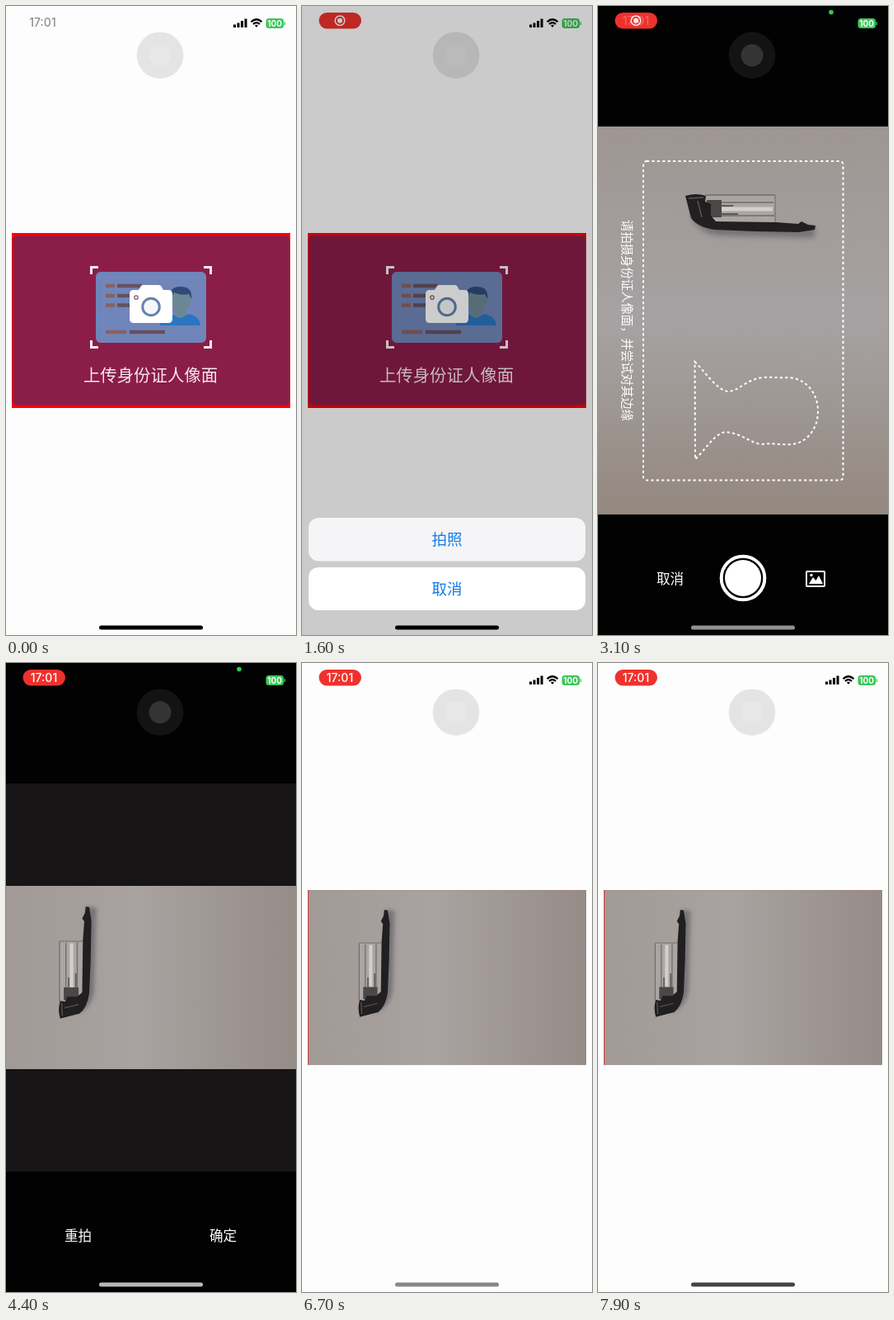
These frames come from a looping animation (352x762 px, 8000 ms). An HTML page:

```html
<!DOCTYPE html>
<html lang="zh-CN">
<head>
<meta charset="utf-8">
<title>上传身份证</title>
<style>
  html, body { margin: 0; width: 100%; height: 100%; overflow: hidden; background: #fdfdfe; }
  svg { display: block; width: 352px; height: 762px; }
  text { font-family: "Noto Sans CJK SC", "Noto Sans CJK", sans-serif; text-anchor: middle; }
  .num { font-family: Inter, Roboto, sans-serif; font-weight: 500; }

  .clock, .pill, .rec, .time, .dot, .dim, .sheet, .camera, .late, .bar {
    animation: 8s linear infinite both;
  }
  .clock { animation-name: clock; }
  .pill { animation-name: pill; }
  .rec { animation-name: rec; }
  .time { animation-name: time; }
  .dot { animation-name: dot; }
  .dim { animation-name: dim; }
  .sheet { animation-name: sheet; }
  .camera { animation-name: camera; }
  .late { animation-name: late; }
  .bar { animation-name: bar; }

  @keyframes clock { 0% { opacity: .55 } 3%, 100% { opacity: 0 } }
  @keyframes pill { 0%, 1% { opacity: 0 } 4%, 100% { opacity: 1 } }
  @keyframes rec { 0%, 38.5% { opacity: 1 } 41.5%, 100% { opacity: 0 } }
  @keyframes time { 0%, 38% { opacity: 0 } 41%, 100% { opacity: 1 } }
  @keyframes dot {
    0%, 36.4% { opacity: 0 }
    36.5%, 77.4% { opacity: 1 }
    77.5%, 100% { opacity: 0 }
  }
  @keyframes dim {
    0% { opacity: 0 }
    10.3% { opacity: 0; animation-timing-function: cubic-bezier(.32, .72, 0, 1) }
    16.5% { opacity: .2 }
    28.1% { opacity: .2; animation-timing-function: ease-in-out }
    31%, 100% { opacity: 0 }
  }
  @keyframes sheet {
    0% { transform: translateY(144px) }
    10.3% { transform: translateY(144px); animation-timing-function: cubic-bezier(.32, .72, 0, 1) }
    16.5% { transform: none }
    28.1% { transform: none; animation-timing-function: ease-in-out }
    31%, 100% { transform: translateY(144px) }
  }
  @keyframes camera {
    0% { transform: translateY(762px) }
    32.5% { transform: translateY(762px); animation-timing-function: cubic-bezier(.32, .72, 0, 1) }
    38.5% { transform: none }
    73.75% { transform: none; animation-timing-function: cubic-bezier(.32, .72, 0, 1) }
    79.5%, 100% { transform: translateY(762px) }
  }
  @keyframes late { 0%, 49.99% { opacity: 0 } 50%, 100% { opacity: 1 } }
  @keyframes bar {
    0%, 34% { fill: #000 }
    38.5% { fill: #8e8e8e }
    42%, 77% { fill: #b8b8b8 }
    83.75% { fill: #888 }
    98%, 100% { fill: #444 }
  }
</style>
</head>
<body>
<svg viewBox="0 0 352 762">
  <defs>
    <linearGradient id="desk" x2="0" y2="1">
      <stop offset="0" stop-color="#9e9692"/>
      <stop offset=".5" stop-color="#a6a2a3"/>
      <stop offset="1" stop-color="#94887f"/>
    </linearGradient>
    <linearGradient id="wide">
      <stop offset="0" stop-color="#a19a97"/>
      <stop offset=".45" stop-color="#a8a2a0"/>
      <stop offset="1" stop-color="#968c88"/>
    </linearGradient>
    <filter id="soft" x="-20%" y="-80%" width="140%" height="260%"><feGaussianBlur stdDeviation="3"/></filter>

    <g id="pen">
      <path d="M112 250 Q118 274 146 278 L262 281 L264 269 L140 262Z" fill="#56545c" opacity=".6" filter="url(#soft)"/>
      <rect x="129" y="228" width="87" height="34" rx="2" fill="#aaa5a3"/>
      <path d="M130 229H215M130 238H213M130 254H214" stroke="#706c6a" stroke-width="1.5"/>
      <path d="M150 246H212" stroke="#d2cfcd" stroke-width="5"/>
      <path d="M132 235H150V256H132Z" fill="#4a4746"/>
      <path d="M149 242H164M149 252H170" stroke="#5d5958" stroke-width="2"/>
      <path d="M215 229V262" stroke="#888380" stroke-width="2"/>
      <path d="M106 230Q119 226 131 230L130 237L137 240V254L143 261L216 262L243 264L247 261L255 265L264 266L263 271L244 274L190 273L142 271Q121 268 113 257Z" fill="#211f20"/>
      <path d="M110 233L128 232M121 236L126 256" stroke="#595554" stroke-width="1.5"/>
    </g>

    <g id="photo">
      <rect y="270" width="352" height="222" fill="url(#wide)"/>
      <use href="#pen" transform="matrix(0 -.86 .86 0 -132 522)"/>
    </g>
  </defs>

  <!-- upload page -->
  <rect width="352" height="762" fill="#fdfdfe"/>
  <text class="num clock" x="44.5" y="25" font-size="14" fill="#333">17:01</text>
  <path d="M277.5 26V22.5M282 26V20.5M286.5 26V18M291 26V15.5" stroke="#000" stroke-width="3"/>
  <g fill="none" stroke="#000" stroke-width="2.2">
    <path d="M297.5 19.3Q304 13.2 310.5 19.3M300 22Q304 18.3 308 22"/>
    <path d="M302 23.6Q304 22 306 23.6L304 26Z" fill="#000" stroke="none"/>
  </g>

  <rect x="7" y="275" width="338" height="212" fill="#f5050c"/>
  <rect x="8" y="278.5" width="336" height="205" rx="5" fill="#8b1d49"/>
  <rect x="109" y="322" width="134" height="86" rx="6" fill="#7085b9"/>
  <g stroke-width="4.5">
    <path d="M121 339H132M121 351H132M121 362.5H132M121 395H146" stroke="#8a6160"/>
    <path d="M135 339H165M135 351H160M135 362.5H160M150 395H193" stroke="#66505f"/>
  </g>
  <path d="M187 387Q188 376 201 373L211 378L222 373Q235 376 236 387Z" fill="#2b75c2"/>
  <path d="M201 349Q212 341 224 350Q224 366 218 371V375Q211 380 205 375V370Q200 363 201 349Z" fill="#6c8794"/>
  <path d="M200 354Q197 341 210 340Q227 339 225 355L222 349Q212 351 204 347Z" fill="#304a7b"/>
  <path d="M155 344H161L164 339Q165 338 167 338H185Q187 338 188 339L191 344H197Q202 344 202 349V379Q202 384 197 384H155Q150 384 150 379V349Q150 344 155 344Z" fill="#fff"/>
  <circle cx="176" cy="364.5" r="10.3" fill="#f5f7fb" stroke="#6682ad" stroke-width="3"/>
  <circle cx="158" cy="353" r="2.2" fill="none" stroke="#7b6369" stroke-width="1.3"/>
  <path d="M103.5 325V316.5H112M240 316.5H248.5V325M248.5 405V413.5H240M112 413.5H103.5V405" fill="none" stroke="#f8eef3" stroke-width="3"/>
  <text x="175.5" y="454.5" font-size="20.4" fill="#f6e9ef">上传身份证人像面</text>

  <g class="late">
    <use href="#photo" transform="translate(7 17.2) scale(.96 .955)"/>
    <path d="M7.5 275V487" stroke="#c83a38"/>
  </g>

  <!-- camera -->
  <g class="camera">
    <rect width="352" height="762" fill="#020203"/>
    <rect y="146" width="352" height="470" fill="url(#desk)"/>
    <use href="#pen"/>
    <g fill="none" stroke="#fff" stroke-width="2" stroke-dasharray="3.2 3.2">
      <rect x="55" y="188" width="242.5" height="386.5" rx="4"/>
      <path d="M117.5 431C128 441 145 466 158 467C172 466 180 452 200 450C212 449 220 451 232 450C254 452 267 470 267 491C267 512 254 529 235 531C222 532 212 529 198 531C182 528 175 518 155 516C142 517 130 538 118 549Z"/>
    </g>
    <text transform="translate(30 381) rotate(90)" font-size="14.35" fill="#fff">请拍摄身份证人像面，并尝试对其边缘</text>
    <text x="87.5" y="699.5" font-size="16.6" fill="#fff">取消</text>
    <circle cx="176" cy="693" r="26.3" fill="none" stroke="#fff" stroke-width="4"/>
    <circle cx="176" cy="693" r="22" fill="#fff"/>
    <rect x="253" y="685" width="22" height="18" rx="1" fill="none" stroke="#fff" stroke-width="2"/>
    <path d="M256 700L261 692L264.5 696L268 690L273 700Z" fill="#fff"/>
    <circle cx="259" cy="689.5" r="1.7" fill="#fff"/>

    <g class="late">
      <rect width="352" height="762" fill="#020203"/>
      <rect y="146" width="352" height="470" fill="#161415"/>
      <use href="#photo"/>
      <g font-size="16.6" fill="#fff">
        <text x="87.5" y="699.5">重拍</text>
        <text x="263.5" y="699.5">确定</text>
      </g>
    </g>
  </g>

  <!-- system layer -->
  <g class="pill">
    <rect x="20.5" y="8" width="51.5" height="19.5" rx="9.75" fill="#ef312c"/>
    <g class="rec">
      <circle cx="46" cy="17.7" r="5.8" fill="none" stroke="#fff" stroke-width="1.5"/>
      <circle cx="46" cy="17.7" r="3" fill="#fff"/>
    </g>
    <text class="num time" x="46" y="22.6" font-size="14" fill="#fff">17:01</text>
  </g>
  <rect x="315.5" y="15" width="21.5" height="12" rx="3.5" fill="#3cc75a"/>
  <path d="M338.3 19.3V23" stroke="#3cc75a" stroke-width="1.4"/>
  <text class="num" x="326.2" y="24.7" font-size="10" fill="#fff" style="font-weight:700">100</text>
  <circle class="dot" cx="283" cy="7.5" r="2.8" fill="#35c759"/>
  <circle cx="187" cy="59.7" r="28.3" fill="#6e6e6e" opacity=".17"/>
  <circle cx="187" cy="59.7" r="13.5" fill="#fff" opacity=".14"/>

  <!-- action sheet -->
  <rect class="dim" width="352" height="762"/>
  <g class="sheet">
    <rect x="8" y="620" width="336" height="52.5" rx="12" fill="#f5f4f6"/>
    <rect x="8" y="680" width="336" height="52" rx="12" fill="#fff"/>
    <g font-size="18.5" fill="#147de6">
      <text x="176" y="653">拍照</text>
      <text x="176" y="713" font-weight="500">取消</text>
    </g>
  </g>
  <rect class="bar" x="113" y="750.5" width="126" height="5" rx="2.5"/>
</svg>
</body>
</html>
```
